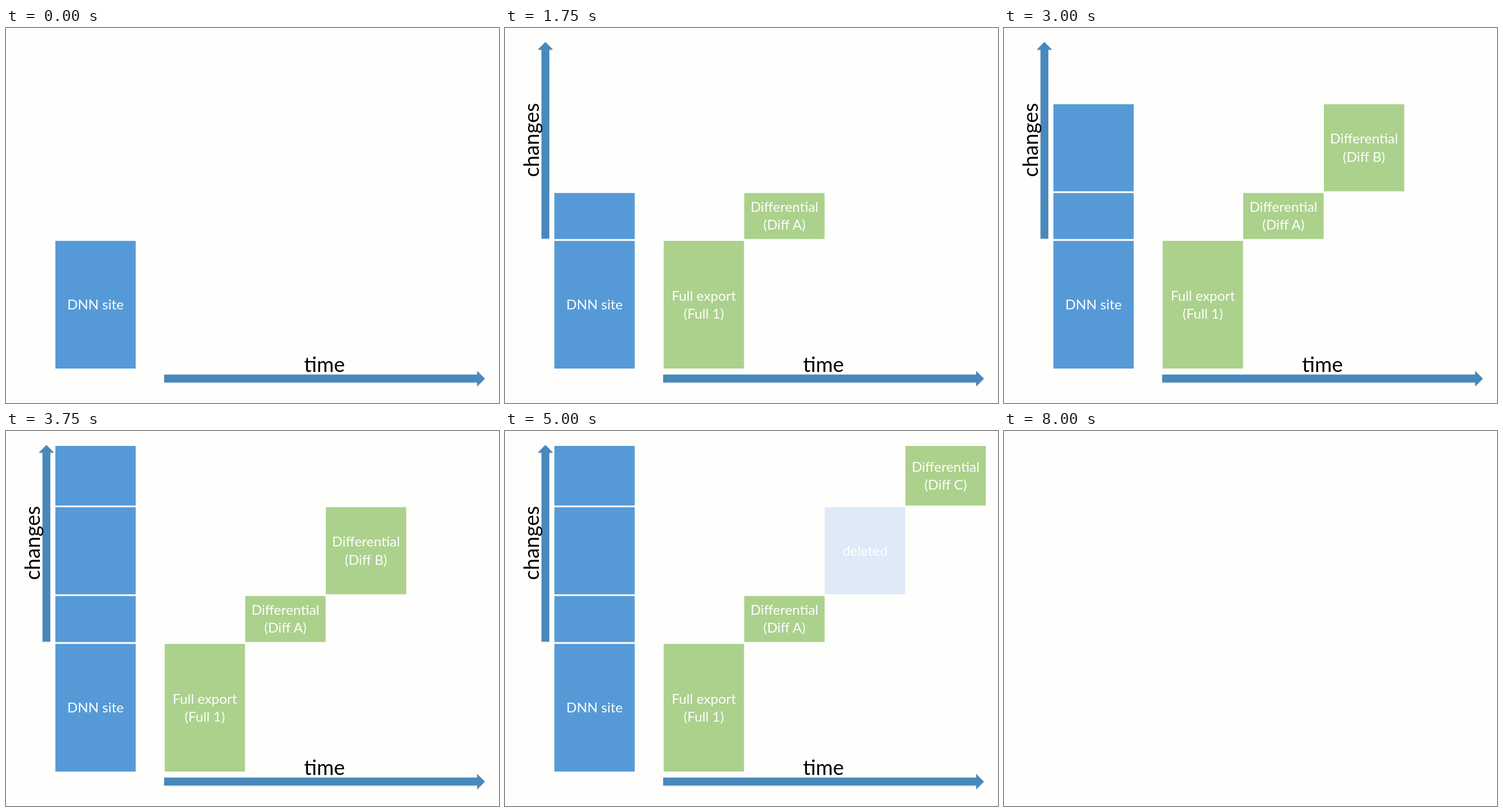
An HTML page for the animation above (8500 ms loop, 857 px wide and 653 px high).

```html
<!DOCTYPE html>
<html lang="en">
<head>
<meta charset="utf-8">
<title>Full and differential exports</title>
<style>
  html, body { margin: 0; width: 100%; height: 100%; overflow: hidden; background: #fefefc; }
  svg { display: block; width: 857px; height: 653px; }
  text { font-family: Lato, sans-serif; text-anchor: middle; }
  .label { font-size: 23.9px; fill: #fdfefd; }
  .axis { font-size: 36.2px; fill: #000; }
  .arrow { fill: #4788bd; filter: drop-shadow(0 1px 1px rgba(0, 0, 0, .16)); }
</style>
</head>
<body>
<svg id="stage" viewBox="0 0 857 653"></svg>
<script>
const LOOP = 8500, END = 8000, LINE = 31.3;
const BLUE = '#559ad7', GREEN = '#abd18c', RED = '#ff0000', PALE = '#dfeaf8';
const stage = document.getElementById('stage');

function add(parent, tag, attrs, text = '') {
  const node = document.createElementNS('http://www.w3.org/2000/svg', tag);
  for (const key in attrs) node.setAttribute(key, attrs[key]);
  node.textContent = text;
  return parent.appendChild(node);
}

// A group that is visible only from start to end within each loop.
function timed(start, end = END) {
  const group = add(stage, 'g', {});
  const step = (time, visibility) => ({ offset: time / LOOP, visibility, easing: 'steps(1, end)' });
  const steps = [step(start, 'visible'), step(end, 'hidden'), step(LOOP, 'hidden')];
  if (start > 0) steps.unshift(step(0, 'hidden'));
  group.animate(steps, { duration: LOOP, iterations: Infinity });
  return group;
}

function axis(start, word, points, x, y, angle) {
  const group = timed(start);
  add(group, 'polygon', { points, class: 'arrow' });
  add(group, 'text', { class: 'axis', transform: `translate(${x} ${y}) rotate(${angle})` }, word);
}

function block({ x, row, fill, lines = [], start, end }) {
  const [top, bottom] = row;
  const group = timed(start, end);
  add(group, 'rect', { x, y: top, width: 139.7, height: bottom - top, fill });
  const first = (top + bottom) / 2 + 8.3 - (lines.length - 1) * LINE / 2;
  lines.forEach((line, i) =>
    add(group, 'text', { class: 'label', x: x + 69.8, y: first + i * LINE }, line));
}

const rows = {
  base: [370.7, 593],
  a: [287.4, 367.5],
  b: [132.7, 284.4],
  c: [26, 129.8]
};
const columns = { site: 85.8, full: 275.8, a: 415.9, b: 556, c: 696.1 };

axis(0, 'time', '275,603.5 819,603.5 819,597 832.5,610.5 819,624 819,617.3 275,617.3', 553.5, 599, 0);
axis(1250, 'changes', '63.5,366.8 63.5,37.8 57,37.8 70.2,24.3 83.5,37.8 77,37.8 77,366.8', 58.5, 195, -90);

[
  { x: columns.site, row: rows.base, fill: BLUE, lines: ['DNN site'], start: 0 },
  { x: columns.full, row: rows.base, fill: GREEN, lines: ['Full export', '(Full 1)'], start: 500 },
  { x: columns.site, row: rows.a, fill: BLUE, start: 1250 },
  { x: columns.a, row: rows.a, fill: GREEN, lines: ['Differential', '(Diff A)'], start: 1750 },
  { x: columns.site, row: rows.b, fill: BLUE, start: 2500 },
  { x: columns.b, row: rows.b, fill: GREEN, lines: ['Differential', '(Diff B)'], start: 3000, end: 5000 },
  { x: columns.site, row: rows.c, fill: BLUE, start: 3750 },
  { x: columns.c, row: rows.c, fill: GREEN, lines: ['Differential', '(Diff C)'], start: 4250, end: 6000 },
  { x: columns.b, row: rows.b, fill: PALE, lines: ['deleted'], start: 5000 },
  { x: columns.c, row: rows.c, fill: RED, lines: ['Differential', '(Diff C)', 'invalidated'], start: 6000 }
].forEach(block);
</script>
</body>
</html>
```
